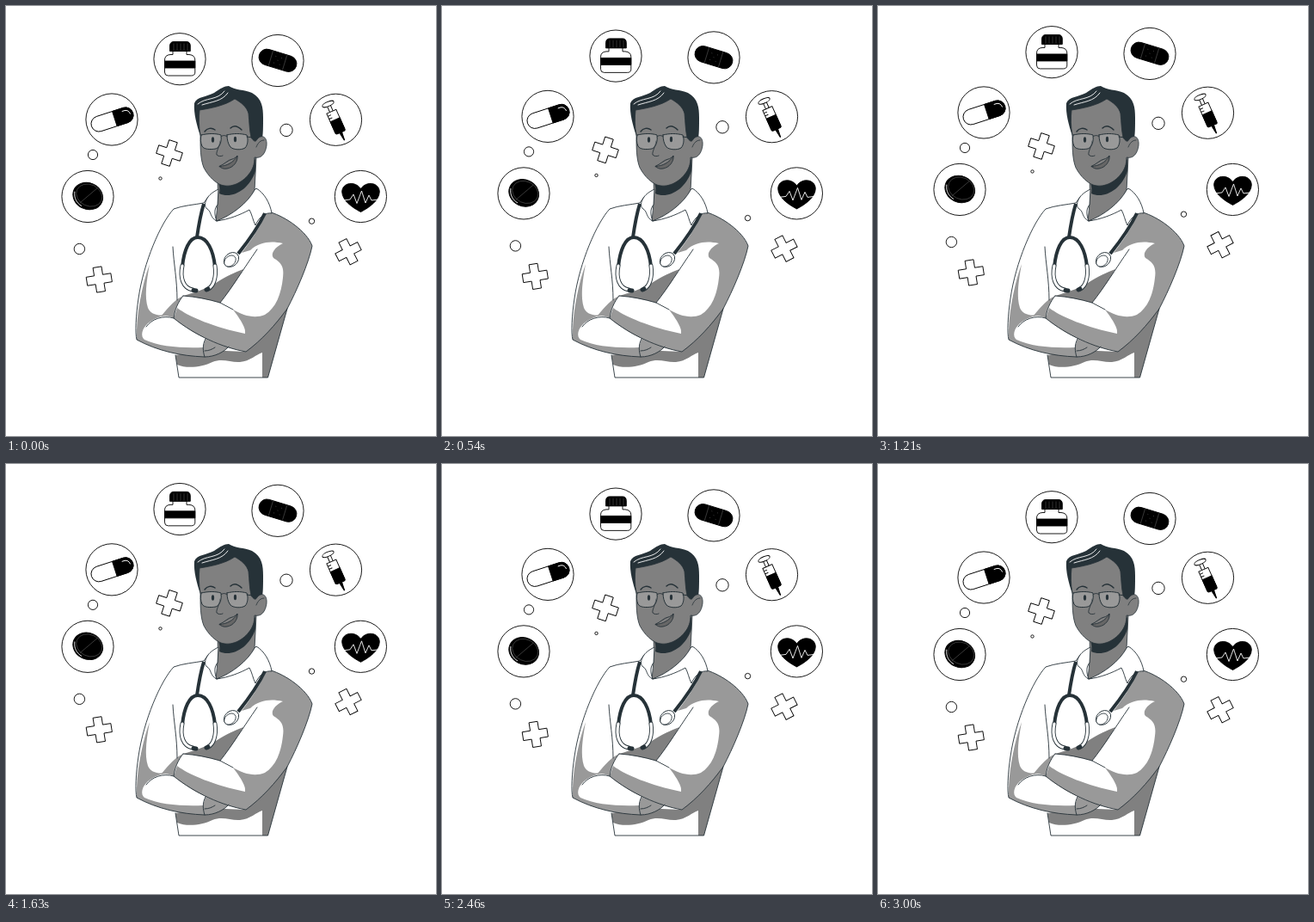
Animation of 500 by 500 pixels, one loop 3040 ms. Source, as an HTML page:

```html
<!DOCTYPE html>
<html lang="en">
<head>
<meta charset="utf-8">
<title>Doctor with floating icons</title>
<style>
html, body { margin: 0; height: 100%; overflow: hidden; background: #fff; }
svg { display: block; width: 100vw; height: 100vh; }
.line { fill: none; stroke: #263238; stroke-linecap: round; stroke-linejoin: round; }
.white { fill: #fff; stroke: #263238; stroke-linejoin: round; }
.shade { fill: #999; }
.deep { fill: #808080; }
.skin { fill: #808080; stroke: #263238; stroke-width: .8; }
.dark { fill: #263238; }
.shine { fill: none; stroke: #fff; stroke-linecap: round; stroke-linejoin: round; }
#float { fill: #fff; stroke: #000; stroke-width: .9; }
#float .black { fill: #000; }
#float .shine { fill: none; stroke: #fff; }
#float .faint { fill: none; stroke: #555; stroke-width: .6; }
</style>
</head>
<body>
<svg viewBox="0 0 500 500">
<defs>
  <path id="cross" d="M-5-14.5H5V-5H14.5V5H5V14.5H-5V5H-14.5V-5H-5Z"/>
  <circle id="disc" r="30.1"/>
</defs>

<g id="body">
  <path fill="#fff" d="M235 222L195 236L152 388L197 406L201 432H304L327 352L356 279L310 241L291 212Z"/>

  <!-- torso and arm shading -->
  <path class="deep" d="M197 406L199 417C210 422 228 420 240 414C252 409 262 415 272 414C284 413 291 405 298 403V432H304.500L327 352L279 402L232 400Z"/>
  <path class="shade" d="M308 240C325 245 350 262 356 279C352 299 338 331 327 352C313 371 298 388 279 402C251 397 218 383 195 363L199 351C212 361 243 374 278 381C279 376 276 369 264 353C276 360 289 364 301 359C314 351 320 335 322 316C324 302 319 298 311 293C307 288 313 280 322 276C308 273 295 274 284 284L274 287C284 274 295 258 302 242Z"/>
  <path class="deep" d="M206 337C220 333 232 329 244 322C256 314 266 310 276 306C268 320 259 332 249 345C234 341 220 338 206 337Z"/>
  <path class="shade" d="M206 337C197 341 190 349 180 361C186 359 192 361 195 363C196 353 200 344 206 337Z"/>
  <path class="shade" d="M167 300C158 325 151 360 152 388C176 401 203 407 231 408C243 408 254 402 259 396C250 394 240 390 232 387L229 397C204 398 178 396 161 388C156 384 158 375 165 369C172 363 180 361 187 359C176 361 168 358 165 351C161 338 163 322 167 300Z"/>

  <!-- coat outlines -->
  <g class="line" stroke-width=".9">
    <path d="M235 222L230 229C220 231 205 232 195 236C180 252 160 298 154 340C151 360 150 380 152 388C176 401 203 407 231 408C243 408 254 402 259 396"/>
    <path d="M197 406L201 432H304.500L327 352"/>
    <path d="M194 280C195 300 199 318 199 342"/>
    <path d="M163 373C169 364 183 359 195 363"/>
    <path d="M206 337C200 344 196 354 195 363C220 383 251 397 279 402C298 388 313 371 327 352C338 331 352 299 356 279C350 262 325 245 308 240"/>
    <path d="M206 337C221 338 235 341 249 345L264 353"/>
    <path d="M249 345C262 329 276 306 292 283"/>
    <path d="M232 387C228 394 229 402 231 408M231 401C236 401 240 399 243 397"/>
  </g>

  <!-- neck and collar -->
  <path class="skin" d="M246 202C247 217 246 233 244 250C259 247 278 234 289 215L291 176Z"/>
  <path class="dark" d="M246 202C248 208 249 213 248 218C262 225 283 214 290 192V178Z"/>
  <path class="white" stroke-width=".9" d="M247 213C241 216 237 219 235 222C231 228 230 233 234 236C239 239 237 246 245 250C242 242 242 236 246 231Z"/>
  <path class="white" stroke-width=".9" d="M291 212C300 217 307 229 309 241C302 240 295 244 290 255C287 249 286 242 283 237C272 243 259 248 245 250C263 243 281 229 289 214Z"/>

  <!-- stethoscope -->
  <g class="line" stroke-width="4" style="stroke-linecap:butt">
    <path d="M230 230C226 243 224 255 222 269M301 241C293 258 282 273 270 288"/>
    <path d="M205 303C207 284 213 269 223 269C234 269 241 284 243 303"/>
  </g>
  <g class="line">
    <path stroke-width="5" d="M205 302C202 316 206 328 217 330M243 302C245 316 241 326 235 329"/>
    <path style="stroke:#fff" stroke-width="3.2" d="M205 302C202 316 206 328 217 330M243 302C245 316 241 326 235 329"/>
    <path stroke-width="5" d="M218 330.500L221 331M235 329L233 330"/>
  </g>
  <ellipse class="white" stroke-width=".9" cx="262" cy="295" rx="9.500" ry="7.500" transform="rotate(-42 262 295)"/>
  <ellipse class="white" stroke-width=".8" cx="260.500" cy="296.500" rx="7.500" ry="5.600" transform="rotate(-42 260.500 296.500)"/>

  <!-- head -->
  <path class="dark" d="M226 151C222 139 218 125 219 113C222 105 233 106 242 101C249 96 254 93 259 93C266 98 277 97 286 101C298 108 299 118 299 130C299 140 299 149 298 153L289 162L280 150Z"/>
  <path class="skin" d="M226 150C224 140 224 130 225 121C238 119 254 116 266 108C273 112 280 117 282 125C283 135 283 144 285 153C288 157 290 159 292 155C298 148 304 153 303 162C302 171 297 178 289 176C289 184 287 190 282 196C275 205 262 212 250 208C243 205 236 199 230 188C226 178 226 165 226 150Z"/>
  <path class="line" stroke-width=".8" d="M291 164C293 159 296 156 300 156"/>
  <path class="shine" stroke-width=".9" d="M223 114C232 106 246 110 254 99M228 115C240 111 251 111 258 101"/>
  <g class="line">
    <path stroke-width="1.500" d="M231 146C234 142 239 141 243 144M261 142C265 138 270 140 274 144"/>
    <path stroke-width=".9" d="M249 157C248 164 244 170 245 173C247 175 250 175 252 174"/>
  </g>
  <path fill="#666" class="line" style="fill:#666" stroke-width=".9" d="M248 186.500C254 184 258 179 263 178C265 178 267 176 269 174C270 181 264 188 257 189C253 190 250 188 248 186.500C257 186 264 182 269 175"/>
  <g class="line" stroke-width="1" style="fill:rgba(255,255,255,.2)">
    <path d="M227 150C235 148 244 148 250 150C251 157 249 164 244 166C238 167 230 167 228 163C226 159 226 154 227 150Z"/>
    <path d="M257 150C264 148 273 148 280 150C282 155 281 162 278 165C273 168 264 167 261 164C258 160 257 155 257 150Z"/>
    <path style="fill:none" d="M250 152C252 150 255 150 257 152M280 152L287 153"/>
  </g>
  <ellipse class="dark" cx="240.500" cy="155.500" rx="1.600" ry="3.200"/>
  <ellipse class="dark" cx="266.500" cy="155" rx="1.600" ry="3.200"/>
</g>

<g id="float">
  <use href="#disc" x="202" y="61.700"/>
  <use href="#disc" x="316" y="63.500"/>
  <use href="#disc" x="123" y="132"/>
  <use href="#disc" x="383.500" y="132.300"/>
  <use href="#disc" x="95" y="221.500"/>
  <use href="#disc" x="412.400" y="221.500"/>

  <circle cx="101" cy="173" r="5.600"/>
  <circle cx="326" cy="144.400" r="7.200"/>
  <circle cx="85.400" cy="282.500" r="6.200"/>
  <circle cx="179.500" cy="200.500" r="1.700"/>
  <circle cx="355.500" cy="250.200" r="3.200"/>
  <use href="#cross" transform="translate(190 171) rotate(18)"/>
  <use href="#cross" transform="translate(108.300 318) rotate(-9)"/>
  <use href="#cross" transform="translate(398 285.700) rotate(-27)"/>

  <!-- bottle -->
  <path d="M194 52V56.500H191Q184.500 57 184.500 63V77Q184.500 81 188.500 81H215.500Q219.800 81 219.800 77V63Q219.800 57 213 56.500H210V52Z"/>
  <path class="black" d="M184.500 64H219.800V72H184.500Z"/>
  <path class="black" d="M190.500 52.500V46Q191 41.500 195 41.500H210Q214 41.500 214.300 46V52.500Z"/>
  <path class="faint" d="M195 43.500V52M199 43.500V52M203 43.500V52M207 43.500V52M211 43.500V52"/>

  <!-- bandage -->
  <g transform="translate(316 63.300) rotate(17)">
    <rect class="black" x="-22.500" y="-9.300" width="45" height="18.600" rx="9.300"/>
    <path class="faint" d="M-8.500-9V9M8.500-9V9M-4-4H-3M3-4H4M-4 4H-3M3 4H4M-.5 0H.5"/>
  </g>

  <!-- capsule -->
  <g transform="translate(123.500 132) rotate(-18)">
    <rect x="-25.300" y="-9" width="50.600" height="18" rx="9"/>
    <path class="black" d="M3-9H16.300A9 9 0 0 1 16.300 9H3Z"/>
    <path class="shine" d="M14-5.500H17Q21.500-5 22 0"/>
  </g>

  <!-- syringe -->
  <g transform="translate(374.500 114) rotate(-24)">
    <path d="M-2 0V11H2V0Z"/>
    <ellipse rx="7.200" ry="2.600"/>
    <path d="M-6 9.500H6V34Q6 36 4 36H-4Q-6 36-6 34Z"/>
    <path class="black" d="M-6 20H6V34Q6 36 4 36H-4Q-6 36-6 34Z"/>
    <path class="black" d="M-1.500 36H1.500L.5 46H0Z"/>
    <path d="M-6 13H-2M-6 16.500H-2"/>
  </g>

  <!-- tablet -->
  <g transform="translate(95.200 221) rotate(25)">
    <ellipse class="black" rx="17.800" ry="15.300"/>
    <ellipse class="faint" cx="1" cy="-1.500" rx="15.500" ry="12.500"/>
    <path class="faint" d="M6-13L-5 11"/>
    <path class="shine" stroke-width=".8" d="M-16 2C-14 9-8 13-2 13.500"/>
  </g>

  <!-- heart -->
  <path class="black" d="M412.500 239.500C402 234 391 226 390.700 216C391 205 406 203 412.500 212.500C419 203 434 205 434.300 216C434 226 423 234 412.500 239.500Z"/>
  <path class="shine" d="M392 226L400 225L404 219L408 229.500L413.500 215L418 229L422 220L425 226L433 225"/>
</g>
</svg>
<script>
const LOOP = 3040, CYCLE = 3000, FPS = 24, RISE = 10;
const floating = document.getElementById('float');

function draw(now) {
  const step = Math.floor((now % LOOP + 5) * FPS / 1000);
  const phase = Math.min(1, step * 1000 / FPS / CYCLE);
  const y = -RISE * (1 - Math.abs(1 - 2 * phase));
  floating.setAttribute('transform', `translate(0 ${y.toFixed(3)})`);
  requestAnimationFrame(draw);
}
draw(performance.now());
</script>
</body>
</html>
```
